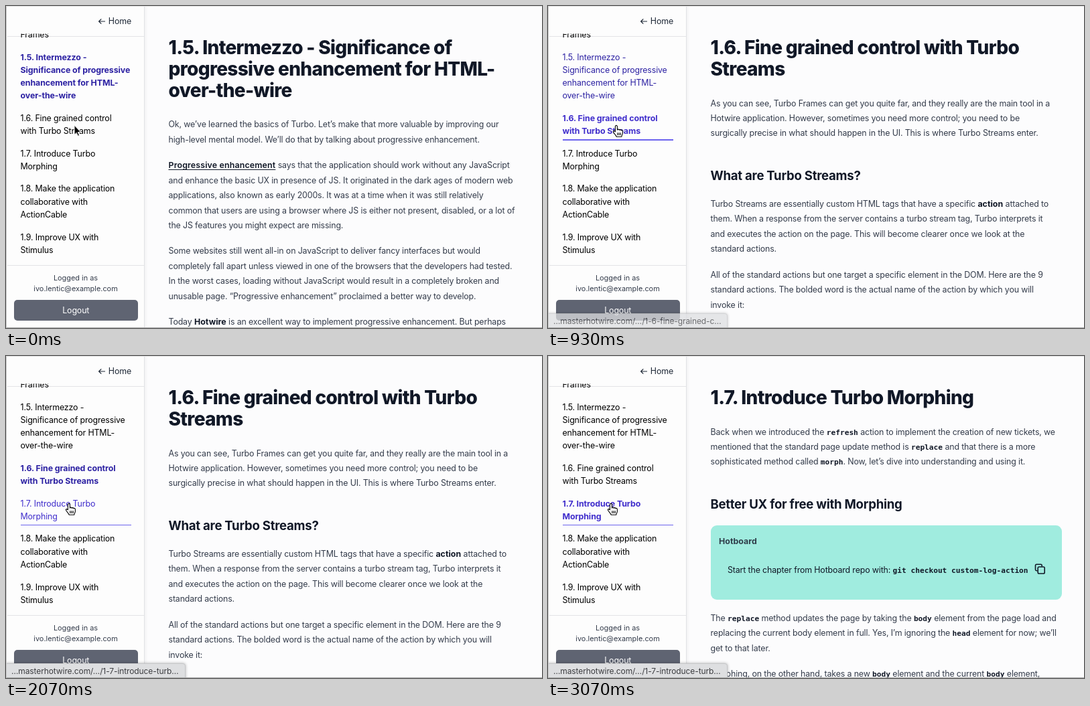
Write an HTML page that moves like this. It is 800 by 481 pixels and loops after 3140 ms.

```html
<!DOCTYPE html>
<html lang="en">
<head>
<meta charset="utf-8">
<style>
html, body { margin: 0; width: 100%; height: 100%; overflow: hidden; }
#stage {
  position: relative; width: 800px; height: 481px; overflow: hidden; background: #fcfcfd;
  font: 12.4px/22.45px Inter, sans-serif; letter-spacing: -.0115em; color: #343c4b; white-space: nowrap;
}
#stage div, h1, h2, p, svg { position: absolute; margin: 0; }
h1, h2, p { left: 242.5px; }
h1 { top: 45.5px; font: 800 28px/32px Inter, sans-serif; letter-spacing: -.024em; color: #111827; }
h2 { font: 700 18.6px/26px Inter, sans-serif; letter-spacing: -.0145em; color: #111827; }
b { font-weight: 700; letter-spacing: .002em; color: #111827; }
u { font-weight: 600; letter-spacing: .012em; color: #111827; text-underline-offset: 2px; }
code { font: 700 11.2px/0 "DejaVu Sans Mono", monospace; letter-spacing: 0; color: #111827; }
.page { inset: 0; }
.box { left: 242.5px; top: 253px; width: 524px; height: 111px; border-radius: 9px; background: #a0ecdf; }
#side { left: 0; top: 0; width: 206px; height: 481px; background: #fdfdfd; border-right: 1px solid #e1e2e5; box-shadow: 1px 0 5px #0000000f; }
.rule { left: 2px; width: 204px; height: 1px; background: #e3e4e7; }
.link { left: 21.5px; width: 165.5px; line-height: 19.2px; color: #000; }
.link i { position: absolute; left: 0; right: 0; bottom: -4.4px; height: 1.6px; background: #6c63ee; opacity: 0; }
.note { left: 2px; width: 204px; text-align: center; font-size: 10.9px; line-height: 16px; letter-spacing: 0; }
#logout { left: 12px; top: 439px; width: 184.5px; height: 31px; line-height: 31px; border-radius: 5px; background: #5f6472; color: #fff; text-align: center; }
#status {
  left: -1px; top: 459px; width: 259px; height: 24px; padding-left: 8px; line-height: 21px; font-size: 12px; letter-spacing: -.1px;
  color: #3c3d40; background: #dedfe1; border: 1px solid #c6c7c9; border-radius: 0 4px 0 0; box-shadow: 0 0 4px #0000004d; box-sizing: content-box;
}
#edge { inset: 0; border: solid; border-width: 1px 0 1.5px 1.5px; border-color: #e2e2e2 transparent #aaa #c6c6c6; }
svg { overflow: visible; width: 1px; height: 1px; left: 0; top: 0; stroke-linejoin: round; }
</style>
</head>
<body>
<div id="stage">
  <div class="page">
    <h1>1.5. Intermezzo - Significance of<br>progressive enhancement for HTML-<br>over-the-wire</h1>
    <p style="top:166.3px">Ok, we’ve learned the basics of Turbo. Let’s make that more valuable by improving our<br>high-level mental model. We’ll do that by talking about progressive enhancement.</p>
    <p style="top:227.3px"><u>Progressive enhancement</u> says that the application should work without any JavaScript<br>and enhance the basic UX in presence of JS. It originated in the dark ages of modern web<br>applications, also known as early 2000s. It was at a time when it was still relatively<br>common that users are using a browser where JS is either not present, disabled, or a lot of<br>the JS features you might expect are missing.</p>
    <p style="top:355.3px">Some websites still went all-in on JavaScript to deliver fancy interfaces but would<br>completely fall apart unless viewed in one of the browsers that the developers had tested.<br>In the worst cases, loading without JavaScript would result in a completely broken and<br>unusable page. “Progressive enhancement” proclaimed a better way to develop.</p>
    <p style="top:460.8px">Today <b>Hotwire</b> is an excellent way to implement progressive enhancement. But perhaps</p>
  </div>
  <div class="page">
    <h1>1.6. Fine grained control with Turbo<br>Streams</h1>
    <p style="top:134.5px">As you can see, Turbo Frames can get you quite far, and they really are the main tool in a<br>Hotwire application. However, sometimes you need more control; you need to be<br>surgically precise in what should happen in the UI. This is where Turbo Streams enter.</p>
    <h2 style="top:240px">What are Turbo Streams?</h2>
    <p style="top:285px">Turbo Streams are essentially custom HTML tags that have a specific <b>action</b> attached to<br>them. When a response from the server contains a turbo stream tag, Turbo interprets it<br>and executes the action on the page. This will become clearer once we look at the<br>standard actions.</p>
    <p style="top:390.7px">All of the standard actions but one target a specific element in the DOM. Here are the 9<br>standard actions. The bolded word is the actual name of the action by which you will<br>invoke it:</p>
  </div>
  <div class="page">
    <h1>1.7. Introduce Turbo Morphing</h1>
    <p style="top:102.5px">Back when we introduced the <code>refresh</code> action to implement the creation of new tickets, we<br>mentioned that the standard page update method is <code>replace</code> and that there is a more<br>sophisticated method called <code>morph</code>. Now, let’s dive into understanding and using it.</p>
    <h2 style="top:208px">Better UX for free with Morphing</h2>
    <div class="box"></div>
    <p style="left:255px;top:266px"><b style="color:#2f3d4a">Hotboard</b></p>
    <p style="left:268px;top:309px;color:#111827">Start the chapter from Hotboard repo with: <code>git checkout custom-log-action</code></p>
    <svg fill="none" stroke="#111827" stroke-width="1.6"><rect x="731.2" y="315" width="10" height="10" rx="1.8"/><path d="M730.5 320.7H729.2a1.7 1.7 0 0 1-1.7-1.7V313a1.7 1.7 0 0 1 1.7-1.7H735.5a1.7 1.7 0 0 1 1.7 1.7V314.5"/></svg>
    <p style="top:380.7px">The <code>replace</code> method updates the page by taking the <code>body</code> element from the page load and<br>replacing the current body element in full. Yes, I’m ignoring the <code>head</code> element for now; we’ll<br>get to that later.</p>
    <p style="top:464px">Morphing, on the other hand, takes a new <code>body</code> element and the current <code>body</code> element,</p>
  </div>

  <div id="side">
    <div class="rule" style="top:45px"></div>
    <div class="link" style="top:32.5px;clip-path:inset(9px 0 0)">Frames</div>
    <div class="link" style="top:66.5px">1.5. Intermezzo -<br>Significance of progressive<br>enhancement for HTML-<br>over-the-wire<i></i></div>
    <div class="link" style="top:158px">1.6. Fine grained control<br>with Turbo Streams<i></i></div>
    <div class="link" style="top:210.6px">1.7. Introduce Turbo<br>Morphing<i></i></div>
    <div class="link" style="top:263.4px">1.8. Make the application<br>collaborative with<br>ActionCable</div>
    <div class="link" style="top:335.6px">1.9. Improve UX with<br>Stimulus</div>
    <div style="right:19px;top:11.5px;color:#1f2937">Home</div>
    <svg fill="none" stroke="#1f2937" stroke-width="1.2"><path d="M148 23H138.7M142.3 19.3L138.6 23L142.3 26.7"/></svg>
    <div class="rule" style="top:386.5px"></div>
    <div class="note" style="top:397.5px">Logged in as<br>ivo.lentic@example.com</div>
    <div id="logout">Logout</div>
  </div>
  <div id="status"></div>
  <div id="edge"></div>
  <svg id="cursor">
    <path id="arrow" fill="#000" stroke="#fff" d="M0 0V14L3.2 11L5.4 16L7.6 15L5.4 10.2H9.8Z"/>
    <g id="hand" fill="#fff" stroke="#000" stroke-width="1.1">
      <path d="M-1.6 9.5V1.6a1.5 1.5 0 0 1 3 0V6.8c.3-1.4 2.6-1.3 2.9.3c.4-1.2 2.5-1 2.8.5c.6-.9 2.3-.6 2.3 1v3c0 2-1.4 2.8-1.6 5.4h-7.6c-.4-2.2-2.9-3.8-4.6-6.9c-.8-1.5.9-2.4 2-1.1z"/>
      <path d="M1.8 11v3.6M4 11v3.6M6.2 11v3.6"/>
    </g>
  </svg>
</div>
<script>
const LOOP = 3140, FADE = 150;
const CLICK = [930, 2130], HOVER = [660, 1813], LEAVE = 1772;
const BLACK = [0, 0, 0], ACTIVE = [45, 34, 163], HOT = [64, 46, 204];

const $ = id => document.getElementById(id);
const pages = document.querySelectorAll('.page');
const links = [...document.querySelectorAll('.link')].slice(1, 4);
const ramp = (t, start, length) => Math.min(1, Math.max(0, (t - start) / length));
const mix = (a, b, k) => a.map((v, i) => v + (b[i] - v) * k);

function setLink(i, color, bold, line) {
  const s = links[i].style;
  s.color = `rgb(${color.map(Math.round)})`;
  s.fontWeight = bold ? 700 : 400;
  s.letterSpacing = bold ? '-.007em' : '';
  links[i].lastChild.style.opacity = line;
}

function draw(t) {
  const page = t < CLICK[0] ? 0 : t < CLICK[1] ? 1 : 2;
  pages.forEach((p, i) => p.style.visibility = i === page ? 'visible' : 'hidden');

  const in6 = ramp(t, HOVER[0], FADE), out6 = ramp(t, LEAVE, FADE), in7 = ramp(t, HOVER[1], FADE);
  setLink(0, mix(ACTIVE, BLACK, ramp(t, CLICK[0] + 30, 300)), page === 0, 0);
  const color6 = mix(mix(BLACK, HOT, in6), ACTIVE, out6);
  setLink(1, mix(color6, BLACK, ramp(t, CLICK[1] + 30, 300)), page === 1, in6 - out6);
  setLink(2, mix(BLACK, HOT, in7), page === 2, in7);

  $('status').style.opacity = ramp(t, 875, 75);
  $('status').textContent = '…masterhotwire.com/…/' + (t < HOVER[1] ? '1-6-fine-grained-c…' : '1-7-introduce-turb…');

  const k = ramp(t, 1640, 260), move = k * k * (3 - 2 * k);
  const pointing = t >= HOVER[0] && t < LEAVE || t >= HOVER[1];
  $('cursor').style.transform = `translate(${102 - 8 * move}px, ${178.3 + 42 * move}px)`;
  $('hand').style.display = pointing ? '' : 'none';
  $('arrow').style.display = pointing ? 'none' : '';
}

const begin = performance.now();
function tick() {
  draw((performance.now() - begin) % LOOP);
  requestAnimationFrame(tick);
}
tick();
</script>
</body>
</html>
```
